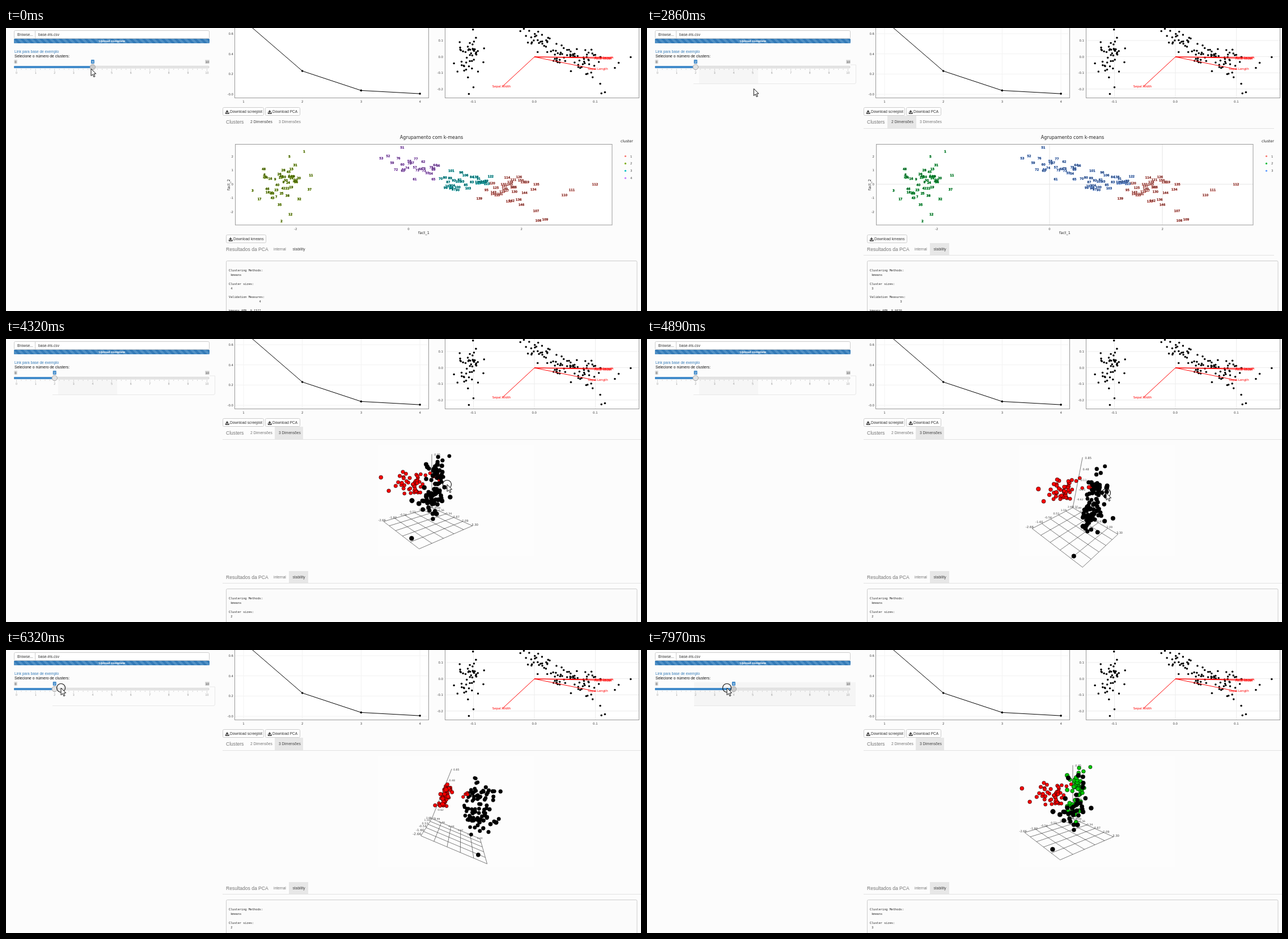
An HTML page that plays this animation: 1120 px wide and 500 px high, repeating every 8 s.

```html
<!DOCTYPE html>
<html lang="pt">
<head>
<meta charset="utf-8">
<title>Agrupamento</title>
<style>
html, body { margin: 0; width: 100%; height: 100%; overflow: hidden; background: #fcfcfc; }
svg { display: block; width: 1120px; height: 500px; }
text { font: 6.67px "Liberation Sans", Arial, sans-serif; fill: #333; white-space: pre; }
.nav { fill: #777; }
.head { font-size: 8.57px; fill: #777; }
.on { fill: #444; }
.plot { font-family: "DejaVu Sans", sans-serif; font-size: 6.5px; fill: #222; }
.tick { font-family: "DejaVu Sans", sans-serif; font-size: 5.4px; fill: #444; }
.tag { font-size: 5.2px; }
.mono { font: 5.26px "Liberation Mono", "DejaVu Sans Mono", monospace; fill: #222; }
.label { font: 5.4px "DejaVu Sans", sans-serif; fill: #151515; paint-order: stroke; stroke-width: .75px; }
.mid { text-anchor: middle; }
.end { text-anchor: end; }
.vector { stroke: #f00; fill: none; }
.red { fill: #f00; }
</style>
</head>
<body>
<svg viewBox="0 0 1120 500">
  <defs>
    <pattern id="stripes" width="8" height="8" patternUnits="userSpaceOnUse" patternTransform="rotate(-45)">
      <rect width="8" height="8" fill="#337ab7"/><rect width="4" height="8" fill="#5090c5"/>
    </pattern>
  </defs>
  <g id="panel"></g>
  <g id="charts"></g>
  <g id="slider"></g>
  <g id="clusters"></g>
  <g id="results"></g>
  <g id="pointer"></g>
</svg>
<script>
const LOOP = 8000;
const STEP = 142.5, DRAG_START = 4320;

const range = n => [...Array(n).keys()];
const text = (x, y, s, cls = '', extra = '') => `<text x="${x}" y="${y}" class="${cls}" ${extra}>${s}</text>`;
const rect = (x, y, w, h, fill, stroke = 'none', r = 0) =>
  `<rect x="${x}" y="${y}" width="${w}" height="${h}" rx="${r}" fill="${fill}" stroke="${stroke}"/>`;
const line = (x1, y1, x2, y2, color, w = 1) =>
  `<path d="M${x1} ${y1}L${x2} ${y2}" stroke="${color}" stroke-width="${w}"/>`;
const dot = (x, y, r, fill, extra = '') => `<circle cx="${x}" cy="${y}" r="${r}" fill="${fill}" ${extra}/>`;

const drawn = {};
function layer(id, markup) {
  if (drawn[id] === markup) return;
  document.getElementById(id).innerHTML = drawn[id] = markup;
}

// Key points: [time, ...values]
const pointerPath = [
  [45, 150, 72], [187, 516, 69], [900, 516, 69], [1470, 118, 72], [2040, 90, 73], [2600, 90, 73],
  [2752, 188, 107], [3000, 366, 157], [3300, 497, 168], [3600, 497, 168], [4150, 645, 250],
  [4320, 778, 257], [4890, 810, 272], [5320, 880, 277], [6315, 97, 67], [6740, 119, 67],
  [7700, 119, 67], [7880, 141, 67]
];
const dragTurn = [[4320, 0, 0, 0], [4890, 3, 12, -15], [5317, -9, 42, -14]];

function track(keys, t) {
  const i = keys.findIndex(k => k[0] > t);
  if (i === 0) return keys[0].slice(1);
  if (i < 0) return keys[keys.length - 1].slice(1);
  const a = keys[i - 1], b = keys[i], p = (t - a[0]) / (b[0] - a[0]);
  return a.slice(1).map((v, j) => v + (b[j + 1] - v) * p);
}

let seed = 29;
const random = () => (seed = (seed * 16807) % 2147483647) / 2147483647;
const gauss = () => (random() + random() + random() - 1.5) * 2;

// Each flower group is a bell-shaped cloud plus a few far points.
const clouds = [
  { count: 47, x: 490, y: 278, sx: 20, sy: 21, far: [[526, 218], [486, 341], [435, 287]] },
  { count: 26, x: 729, y: 251, sx: 20, sy: 14, far: [[699, 211], [674, 226], [662, 230]] },
  { count: 27, x: 800, y: 274, sx: 22, sy: 11, far: [] },
  { count: 38, x: 880, y: 283, sx: 30, sy: 12, far: [[935, 323], [939, 340], [951, 338], [985, 295], [998, 286], [1039, 276]] }
];
const points = clouds.flatMap(({ count, x, y, sx, sy, far }, group) =>
  [...far, ...range(count).map(() => [x + gauss() * sx, y + gauss() * sy])].map(([px, py]) => {
    const u = ((px - 710) / 99.6 + 2.77) / 6.07;
    const v = (2.65 - (275.5 - py) / 24.3) / 5.31;
    const rise = group ? .57 + (.5 - v) * .45 + gauss() * .17 : .58 + gauss() * .1;
    return { x: px, y: py, u, v, h: Math.min(1, Math.max(0, rise)) };
  }));

const palettes = {
  2: ['#f8766d', '#00bfc4'],
  3: ['#f8766d', '#00ba38', '#619cff'],
  4: ['#f8766d', '#7cae00', '#00bfc4', '#c77cff']
};
function clusterOf({ x, y }, k) {
  if (k === 2) return x < 690 ? 1 : 0;
  if (x < 600) return 1;
  if (x + y - 275 > 848) return 0;
  return k === 4 && x + (y - 270) / 2 < 764 ? 3 : 2;
}

function button(x, y, w, label) {
  const i = x + 5.5;
  return rect(x + .5, y + .5, w, 14, '#fff', '#ccc', 2) + text(x + 13, y + 10, label, '', 'style="font-size:6.5px"') +
    `<path d="M${i + 2.5} ${y + 5}v3.5m-2-1.5l2 2l2-2M${i} ${y + 9}v2h5.5v-2" fill="none" stroke="#333" stroke-width="1.3"/>`;
}

function drawPanel() {
  layer('panel',
    rect(14.5, 4.5, 344, 14, '#fff', '#ccc', 2) + line(51.5, 4, 51.5, 18, '#ccc') +
    text(20, 14, 'Browse...') + text(57, 14, 'base-iris.csv') +
    rect(14, 19, 345, 8, 'url(#stripes)', 'none', 1) +
    text(187, 25.2, 'Upload complete', 'mid', 'style="fill:#fff;font-size:5.8px;font-weight:bold"') +
    text(15, 44, 'Link para base de exemplo', '', 'style="fill:#337ab7;font-size:6.5px"') +
    text(15, 52.3, 'Selecione o número de clusters:', '', 'style="fill:#111;font-size:6.8px"'));
}

function drawCharts(grid) {
  const scree = [.73, .229, .037, .005].map((share, i) => [419 + i * 103.7, 117 - 179 * share]);
  const rules = range(4).map(i =>
    line(419 + i * 103.7, 0, 419 + i * 103.7, 123, '#f2f2f2') + line(404, 10 + i * 35.7, 745, 10 + i * 35.7, '#f2f2f2') +
    line(775, 22 + i * 28.6, 1116, 22 + i * 28.6, '#ececec') +
    (i ? line(717 + i * 107.5, 0, 717 + i * 107.5, 123, '#ececec') : '')).join('');
  layer('charts',
    rect(403.5, -5, 342, 128.5, '#fff') + rect(774.5, -5, 342, 128.5, '#fff') + (grid ? rules : '') +
    rect(403.5, -5, 342, 128.5, 'none', '#999') + rect(774.5, -5, 342, 128.5, 'none', '#999') +
    `<path d="M${scree.join('L')}" fill="none" stroke="#000"/>` +
    scree.map(([x, y], i) => dot(x, y, 1.8, '#000') + text(x, 131.5, i + 1, 'tick mid')).join('') +
    range(4).map(i => text(401, 12 + i * 35.7, (.6 - i * .2).toFixed(1), 'tick end')).join('') +
    points.map(p => dot((932 + .516 * (p.x - 710)).toFixed(1), (p.y - 224.5).toFixed(1), 1.75, '#000')).join('') +
    '<path class="vector" d="M1070 52L932 51L1068 54M932 51L1040 73M932 51L876 103"/>' +
    text(874, 105, 'Sepal.Width', 'tick mid red') + text(1055, 53.5, 'Petal.Length', 'tick mid red') +
    text(1053, 56, 'Petal.Width', 'tick mid red') + text(1044, 74, 'Sepal.Length', 'tick mid red') +
    range(4).map(i => text(771, 24 + i * 28.6, ((1 - i) / 10).toFixed(1), 'tick end')).join('') +
    range(3).map(i => text(824 + i * 107.7, 131.5, ((i - 1) / 10).toFixed(1), 'tick mid')).join('') +
    button(382, 140, 72, 'Download screeplot') + button(457, 140, 61, 'Download PCA'));
}

function drawSlider(t, value) {
  const at = v => 18.5 + v * 33.6, x = at(value);
  let well = '';
  if (t >= 6740) well = rect(83, 57, 285, 41.5, '#f5f5f5') + line(83, 98.5, 368, 98.5, '#e6e6e6');
  else if (t >= 950) {
    const left = t < 2040 ? 119 : 82;
    if (t >= 2040 && t < 6320) well = rect(92, 70, 104, 28, '#f6f6f6');
    well += `<path d="M${left} 98.5H366Q368.5 98.5 368.5 96V65H359" fill="none" stroke="#e8e8e8"/>`;
  }
  const ticks = range(41).map(i => line(at(i / 4), 72, at(i / 4), i % 4 ? 74 : 76, '#bbb', .6)).join('');
  layer('slider', well +
    rect(14, 56, 6, 7, '#ddd', 'none', 1) + text(17, 61.5, '0', 'tag mid') +
    rect(351, 56, 8, 7, '#ddd', 'none', 1) + text(355, 61.5, '10', 'tag mid') +
    rect(14.5, 67.5, 343.5, 3, '#eee', '#ccc', 1) + rect(14, 67, x - 14, 4, '#428bca', 'none', 1) + ticks +
    range(11).map(i => text(at(i), 80.5, i, 'tag mid', 'style="fill:#999"')).join('') +
    rect(x - 3, 56, 6, 7, '#428bca', 'none', 1) + text(x, 61.7, value, 'tag mid', 'style="fill:#fff"') +
    dot(x, 69, 4.7, t < 950 || t >= 6740 ? '#c8c8c8' : '#e2e2e2', 'stroke="#aaa"'));
}

function flatPlot(k, grid) {
  const colors = palettes[k];
  return rect(404.5, 205.5, 664.5, 142.5, '#fff') +
    (grid ? line(405, 276, 1069, 276, '#e4e4e4') + [710, 909].map(x => line(x, 206, x, 348, '#e4e4e4')).join('') : '') +
    rect(404.5, 205.5, 664.5, 142.5, 'none', '#999') +
    text(750.5, 195.5, 'Agrupamento com k-means', 'plot mid', 'style="font-size:8px"') +
    text(737, 363.5, 'fact_1', 'plot mid') + text(0, 0, 'fact_2', 'plot mid', 'transform="translate(395 277) rotate(-90)"') +
    range(5).map(i => text(401, 229 + i * 24.4, 2 - i, 'tick end')).join('') +
    [-2, 0, 2].map(v => text(710 + v * 99.6, 356.5, v, 'tick mid')).join('') +
    text(1095, 202, 'cluster', 'plot mid') +
    colors.map((c, i) => dot(1092.5, 226.5 + i * 12.9, 1.6, c) + text(1101, 228.5 + i * 12.9, i + 1, 'tick')).join('') +
    points.map((p, i) => text(p.x.toFixed(1), (p.y + 2).toFixed(1), i + 1, 'label mid', `stroke="${colors[clusterOf(p, k)]}"`)).join('') +
    button(388, 365, 70, 'Download kmeans');
}

function projector(turn) {
  const [a, b, c] = turn.map(d => d * Math.PI / 180);
  const { sin, cos } = Math, yaw = .895, tilt = .367;
  return (u, h, v) => {
    const x0 = u * cos(c) - h * sin(c), y0 = u * sin(c) + h * cos(c);
    const x = x0 * cos(b) + v * sin(b), z0 = v * cos(b) - x0 * sin(b);
    const y = y0 * cos(a) - z0 * sin(a), z = y0 * sin(a) + z0 * cos(a);
    const right = x * cos(yaw) - z * sin(yaw), near = x * sin(yaw) + z * cos(yaw);
    const m = 1 / (1 - (y * sin(tilt) + near * cos(tilt)) / 3.55);
    return [751 + 91 * m * right, 298 - 91 * m * (y * cos(tilt) - near * sin(tilt)), m];
  };
}

function solidPlot(k, turn) {
  const project = projector(turn);
  const edge = (a, b) => line(...project(...a).slice(0, 2), ...project(...b).slice(0, 2), '#444', .7);
  const mark = (value, at, cls) => {
    const [x, y, m] = project(...at);
    return text(x, y + 2, value.toFixed(2), 'tick ' + cls, `style="font-size:${4.4 * m}px"`);
  };
  const frame = range(6).map(i => {
    const p = i / 5;
    return edge([p, 0, 0], [p, 0, 1]) + edge([0, 0, p], [1, 0, p]) +
      mark(-2.77 + 6.07 * p, [p, 0, -.06], 'mid') + mark(2.65 - 5.31 * p, [-.06, 0, p], 'mid') +
      mark(-.99 + 1.84 * p, [.03, p, -.03], '');
  }).join('');
  const balls = points.map(p => ({ at: project(p.u, p.h, p.v), color: ['#000', '#f00', '#00c800'][clusterOf(p, k)] }))
    .sort((a, b) => a.at[2] - b.at[2])
    .map(({ at: [x, y, m], color }) => dot(x.toFixed(1), y.toFixed(1), (2.55 * m).toFixed(2), color, 'stroke="#000" stroke-width=".6"'));
  return rect(656, 188, 276, 195, '#fdfdfd') + frame + edge([0, 0, 0], [0, 1, 0]) + balls.join('');
}

const tabs = (x, y, w, h, solid) =>
  rect(x, y, w, h, '#e7e7e7') + line(382, y + h + .5, solid ? 1120 : 1106, y + h + .5, '#e2e2e2');

function drawClusters(k, solid, grid, turn) {
  layer('clusters',
    (grid ? tabs(solid ? 474 : 424, 155, solid ? 50 : 51, 22, solid) : '') +
    text(388, 169, 'Clusters', 'head') +
    text(431, 168.2, '2 Dimensões', solid ? 'nav' : 'on') + text(481, 168.2, '3 Dimensões', solid ? 'on' : 'nav') +
    (solid ? solidPlot(k, turn) : flatPlot(k, grid)));
}

function drawResults(k, solid, grid, fade) {
  const score = { 2: '0.0128', 3: '0.0630', 4: '0.1577' }[k];
  const rows = ['Clustering Methods:', ' kmeans', '', 'Cluster sizes:', ' ' + k, '', 'Validation Measures:',
    ' '.repeat(17) + k, '', 'kmeans APN  ' + score];
  layer('results', `<g transform="translate(0 ${solid ? 30 : 0})">` +
    (grid ? tabs(499, 380, 34, 21, solid) : '') +
    text(388, 394, 'Resultados da PCA', 'head') + text(472, 393.2, 'internal', 'nav') + text(505.5, 393.2, 'stability', 'on') +
    rect(388.5, 411.5, 724.5, 120, '#fbfbfb', '#ccc', 2) +
    `<g opacity="${fade}">` + rows.map((s, i) => text(393, 430 + i * 7.9, s, 'mono')).join('') + '</g></g>');
}

function drawPointer(t, [x, y]) {
  const hand = t >= 1355 && t < 2590;
  const ring = (t >= DRAG_START && t < 5470) || t >= 6300;
  const shape = hand
    ? 'M-1 1Q0-1 1.5 1V6Q3 4.8 4 6.4Q5.5 5.3 6.5 7Q8.5 6.5 8.5 8.5V11.5Q8 14 6.5 16H0L-4 10Q-4.5 8-2.5 8.5L-1 10Z'
    : 'M0 0V12.5L2.9 9.8L4.9 14.5L6.9 13.6L4.9 9L8.7 8.9Z';
  layer('pointer', (ring ? dot(x, y, 7.5, 'none', 'stroke="#111" stroke-width="1.1"') : '') +
    `<path transform="translate(${x} ${y})" d="${shape}" fill="#fff" stroke="#111"/>`);
}

function draw(t) {
  // Motion is sampled in even steps, state changes are immediate.
  const sampled = DRAG_START + Math.floor((t - DRAG_START) / STEP) * STEP;
  const value = t < 1355 ? 4 : t < 2040 ? 3 : t < 6740 ? 2 : t < 7970 ? 3 : 4;
  const k = t < 1890 ? 4 : t < 3010 ? 3 : t < 7170 ? 2 : 3;
  const solid = t >= 3580, grid = t >= 950, loading = t >= 6740 && t < 7170;
  drawCharts(grid);
  drawSlider(t, value);
  drawClusters(k, solid, grid, t < 7170 ? track(dragTurn, sampled) : [0, 0, 0]);
  drawResults(k, solid, grid, loading ? .3 : 1);
  drawPointer(t, track(pointerPath, sampled));
}

drawPanel();
const start = performance.now();
function tick() {
  draw((performance.now() - start) % LOOP);
  requestAnimationFrame(tick);
}
tick();
</script>
</body>
</html>
```
